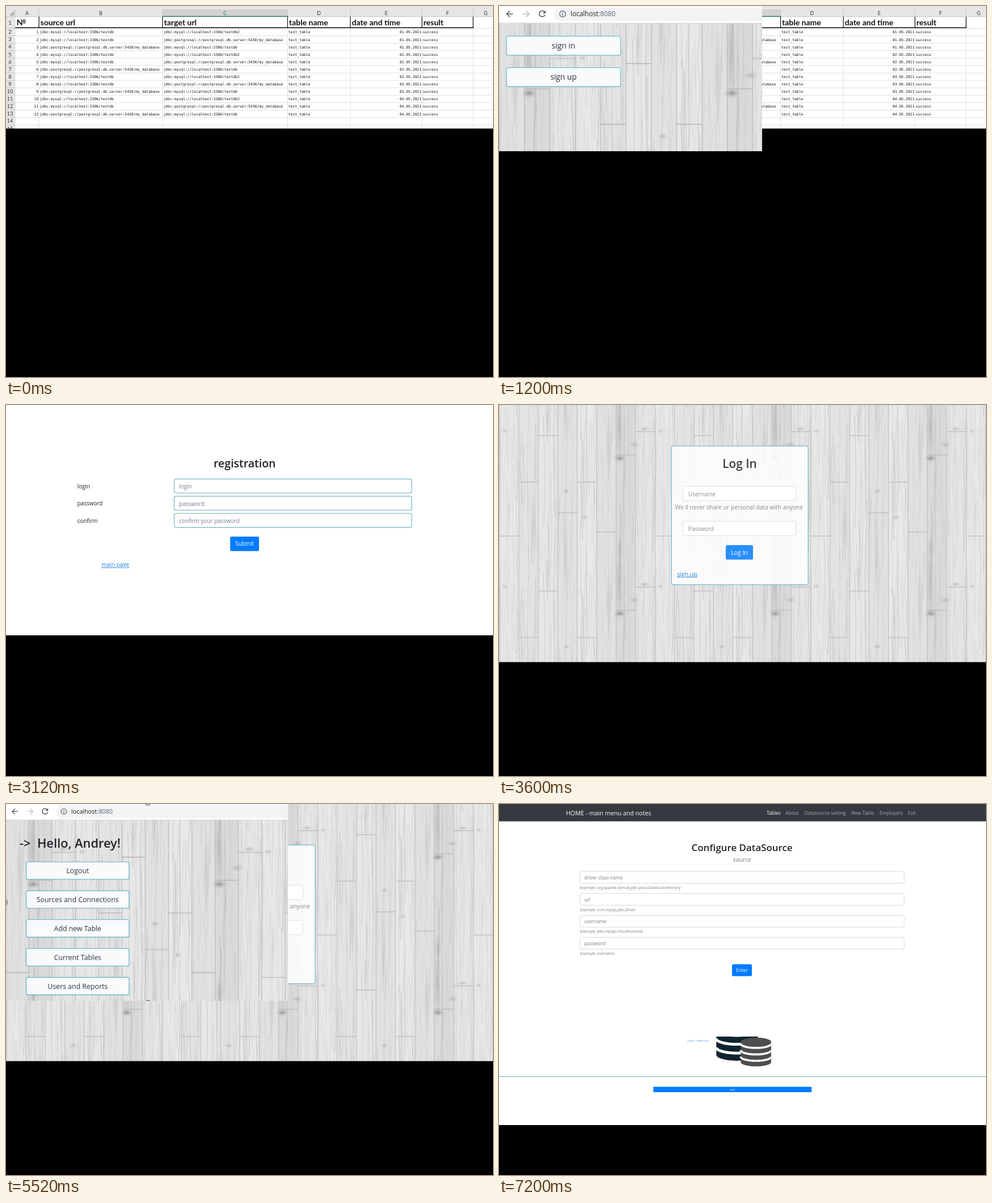
An HTML page for the animation above (8000 ms loop, 857 by 654 pixels).

```html
<!DOCTYPE html>
<html lang="en">
<head>
<meta charset="utf-8">
<style>
html, body { margin: 0; width: 100%; height: 100%; overflow: hidden; background: #000; }
#stage { display: block; width: 857px; height: 654px; font-family: "Open Sans", "Noto Sans", sans-serif; }
.mono { font-family: "DejaVu Sans Mono", monospace; }
.sheet { font-family: Lato, "Open Sans", sans-serif; }
text { white-space: pre; }
</style>
</head>
<body>
<svg id="stage" viewBox="0 0 857 654" xmlns="http://www.w3.org/2000/svg"></svg>
<script>
const LOOP = 8000, STEP = 1200;
const BLUE = '#007bff', TEAL = '#5ab1bf', DARK = '#212529', GREY = '#777c81';

const rect = (x, y, w, h, fill, more = '') =>
  `<rect x="${x}" y="${y}" width="${w}" height="${h}" fill="${fill}" ${more}/>`;
const box = (x, y, w, h, fill, stroke, sw = 1) =>
  rect(x, y, w, h, fill, `rx="3" stroke="${stroke}" stroke-width="${sw}"`);
const line = (x1, y1, x2, y2, stroke, sw = 1) =>
  `<path d="M${x1} ${y1}L${x2} ${y2}" stroke="${stroke}" stroke-width="${sw}"/>`;
const text = (x, y, size, s, fill = DARK, more = '') =>
  `<text x="${x}" y="${y}" font-size="${size}" fill="${fill}" ${more}>${s.replace(/>/g, '&gt;')}</text>`;
const MID = 'text-anchor="middle"', END = 'text-anchor="end"', SEMI = 'font-weight="600"';
const layer = (w, h, body) =>
  `<svg class="layer" width="${w}" height="${h}">${body}</svg>`;

function random(seed) {
  return () => (seed = (seed * 16807) % 2147483647) / 2147483647;
}

// Wooden wall: eight planks per square tile
function woodDefs() {
  const T = 273.8, P = T / 8, rnd = random(77);
  const joints = [231, 136, 54, 190, 136, 224, 88, 47];
  const tones = [0, .025, .005, .03, 0, .03, .06, .01];
  const knots = [[212, 94, 11, 6, .42], [211, 40, 6, 75, .2], [193, 70, 5, 60, .12], [10, 46, 6, 4, .2],
    [118, 152, 7, 4, .22], [151, 198, 6, 5, .22], [256, 42, 9, 4, .22], [238, 70, 10, 5, .2],
    [86, 25, 5, 40, .12], [60, 210, 5, 60, .1], [212, 255, 6, 30, .16], [17, 180, 5, 50, .08]];
  let s = rect(0, 0, T, T, '#e8e8e8');
  for (let p = 0; p < 8; p++) {
    s += rect(p * P, 0, P, T, '#000', `opacity="${tones[p]}"`);
    for (let k = 0; k < 17; k++) {
      const x = p * P + 2 + rnd() * (P - 4), amp = .4 + rnd() * 1.5, ph = rnd() * 6.28;
      const n = 1 + Math.floor(rnd() * 3), y0 = rnd() * T, len = 50 + rnd() * 190;
      let d = '';
      for (let y = y0; y <= y0 + len; y += 9) {
        const gx = x + amp * Math.sin(y / T * 6.283 * n + ph);
        d += (d ? 'L' : 'M') + gx.toFixed(1) + ' ' + y.toFixed(1);
      }
      const look = `fill="none" stroke="#666" stroke-width="${(.4 + rnd() * .8).toFixed(2)}" opacity="${(.06 + rnd() * .17).toFixed(2)}"`;
      s += `<path d="${d}" ${look}/><path d="${d}" ${look} transform="translate(0 ${-T})"/>`;
    }
  }
  for (const [x, y, rx, ry, o] of knots)
    s += `<ellipse cx="${x}" cy="${y}" rx="${rx}" ry="${ry}" fill="url(#knot)" opacity="${o * 1.4}"/>`;
  joints.forEach((y, p) => {
    s += line(p * P, y, (p + 1) * P, y, '#a9a9a9', .9) + line(p * P + .45, 0, p * P + .45, T, '#b2b2b2', .9);
  });
  const use = (id, x, y, k) =>
    `<pattern id="${id}" href="#wood" patternTransform="translate(${x} ${y}) scale(${k})"/>`;
  return `<defs><radialGradient id="knot"><stop offset="0" stop-color="#666"/><stop offset=".4" stop-color="#777" stop-opacity=".6"/><stop offset="1" stop-color="#888" stop-opacity="0"/></radialGradient>
    <pattern id="wood" width="${T}" height="${T}" patternUnits="userSpaceOnUse">${s}</pattern>` +
    use('woodHome', 133.6, 31.3, 1.303) + use('woodLogin', .3, 0, 1) + use('woodMenu', 121.5, 29, 1.198) + '</defs>';
}

function sheet() {
  const xs = [16, 58, 275.5, 495.5, 606, 732, 822, 866];
  const heads = ['№', 'source url', 'target url', 'table name', 'date and time', 'result'];
  const my = 'jdbc:mysql://localhost:3306/testdb';
  const pg = 'jdbc:postgresql://postgresql.db.server:5430/my_database';
  const from = [my, my, pg], to = [my + '2', pg, my];
  const rowY = r => 39.4 + 13.1 * (r - 2);
  let s = rect(0, 0, 857, 216, '#fff') + rect(0, 0, 857, 19, '#e6e6e6') + rect(0, 0, 16, 216, '#e6e6e6');
  s += rect(275.5, 6, 220, 12.5, '#d2d2d2') + '<path d="M14 8.5V17H5.5Z" fill="#b4b4b4"/>';
  xs.forEach((x, i) => {
    s += line(x, 19, x, 216, '#d9d9d9', .8) + line(x, 6, x, 19, '#bdbdbd', .8);
    if (i < 7) s += text(i < 6 ? (x + xs[i + 1]) / 2 : 844, 16, 9, 'ABCDEFG'[i], i == 2 ? '#217346' : '#333', MID);
  });
  for (let r = 2; r <= 15; r++) {
    const y = rowY(r);
    s += line(16, y, 857, y, '#d9d9d9', .8) + line(0, y, 16, y, '#bdbdbd', .8);
    s += text(7, y + 9.8, 9.3, '' + r, '#333', MID);
  }
  s += text(7, 33, 9.3, '1', '#333', MID) + line(0, 18.8, 857, 18.8, '#b0b0b0', .7);
  s += line(275, 18.4, 496, 18.4, '#217346', 1.3) + line(16, 38.3, 822.6, 38.3, '#111', 1.4);
  heads.forEach((h, i) => {
    s += text(xs[i] + 2.5, 34, 14, h, '#111', 'font-weight="700"') + line(xs[i + 1], 19, xs[i + 1], 39, '#111', 1.2);
  });
  let cells = '';
  for (let i = 0; i < 12; i++) {
    const y = rowY(i + 2) + 9, cell = (x, v, more) => text(x, y, 6.36, v, '#111', more);
    cells += cell(57, '' + (i + 1), END) + cell(59.5, from[i % 3]) + cell(277, to[i % 3]) + cell(497, 'test_table') +
      cell(731, `0${1 + Math.floor(i / 3)}.05.2021`, END) + cell(733.5, 'success');
  }
  return `<g class="sheet">${s}</g><g class="mono">${cells}</g>`;
}

function toolbar(w) {
  const arrow = (x, dir, c) =>
    `<path d="M${x - 5.5 * dir} 14H${x + 5.5 * dir}M${x} 8.6L${x + 5.5 * dir} 14L${x} 19.4" fill="none" stroke="${c}" stroke-width="1.5"/>`;
  return rect(-5, -5, w, 35, '#fff') + rect(97, 1.5, w, 25, '#f1f3f4', 'rx="12.5"') + line(-5, 30, w, 30, '#dcdcdc') +
    arrow(19, -1, '#54585c') + arrow(47.5, 1, '#bcbec1') +
    '<path d="M80.3 10.6A5.2 5.2 0 1 0 81 15.4" fill="none" stroke="#54585c" stroke-width="1.6"/><path d="M82 7.8V13H76.8Z" fill="#54585c"/>' +
    '<circle cx="112" cy="14" r="5.3" fill="none" stroke="#5f6368" stroke-width="1.3"/><path d="M112 13v4M112 10.6v1.5" stroke="#5f6368" stroke-width="1.4"/>' +
    text(126, 18.2, 11.7, 'localhost<tspan fill="#5f6368">:8080</tspan>'.replace(/>/g, '\u0001'), '#202124').replace(/\u0001/g, '>');
}

const button = (x, y, w, h, label, size) =>
  box(x, y, w, h, '#f8fafc', TEAL, 1.1) + text(x + w / 2, y + h / 2 + size * .37, size, label, '#30353a', MID);
const solid = (x, y, w, h, label, size, fill = BLUE) =>
  rect(x, y, w, h, fill, 'rx="2.5"') + text(x + w / 2, y + h / 2 + size * .38, size, label, '#fff', MID);
const link = (x, y, size, s) => text(x, y, size, s, '#2580dc', 'text-decoration="underline"');

const home = () => rect(0, 0, 463, 256, 'url(#woodHome)') + toolbar(480) +
  button(13, 53.3, 201, 33.4, 'sign in', 13.7) + button(13, 108.7, 201, 33.4, 'sign up', 13.7);

function signUp() {
  const fields = [['login', 'login'], ['password', 'password'], ['confirm', 'confirm your password']];
  return rect(0, 0, 857, 406, '#fff') + text(420, 110, 19.5, 'registration', DARK, MID + SEMI) +
    fields.map(([a, b], i) => {
      const y = 130.5 + i * 30.3;
      return text(125.5, y + 16.6, 9.9, a) + box(296, y, 418, 24.6, '#fff', '#86c1c5', 1.4) + text(304.5, y + 16.8, 9.9, b, GREY);
    }).join('') +
    solid(394.5, 232, 50.7, 25.4, 'Submit', 9.9) + link(168, 285.3, 10, 'main page');
}

function logIn() {
  const field = (y, s) => box(323.5, y, 199, 25.3, '#fff', '#d8dbde', .9) + text(333, y + 17.2, 9.95, s, '#868b90');
  return rect(0, 0, 857, 453.5, 'url(#woodLogin)') +
    rect(303.5, 72.3, 240.5, 244.5, '#fff', `rx="3" fill-opacity=".86" stroke="${TEAL}"`) +
    text(423.5, 111, 20.8, 'Log In', '#3c4044', MID + SEMI) + field(143.3, 'Username') +
    text(310, 184.3, 10.28, 'We ll never share ur personal data with anyone', '#84898d') + field(205, 'Password') +
    solid(399, 247, 48, 25.4, 'Log In', 10.5, '#2a8ffc') + link(313.5, 301.8, 10.5, 'sign up');
}

function menu() {
  const items = ['Logout', 'Sources and Connections', 'Add new Table', 'Current Tables', 'Users and Reports'];
  return rect(0, 0, 496, 347, 'url(#woodMenu)') +
    `<g transform="translate(-1.6 .2) scale(.924)">${toolbar(560)}</g>` +
    '<path d="M245.5 0Q249.5 4.5 253.5 0M0 169.5Q4 173.5 0 178M247 346.5h6" fill="none" stroke="#555" stroke-width="1.2"/>' +
    text(24, 77, 21.8, '->', DARK, SEMI) + text(55, 77, 21.8, 'Hello, Andrey!', DARK, SEMI) +
    items.map((s, i) => button(35.6, 102 + i * 50.9, 181, 30.8, s, 12.3)).join('');
}

// Database drum, 73.5 by 70 at k = 1
function drum(x, y, k, fill) {
  const arc = e => `<path d="M-.5 ${e}A37.2 10.5 0 0 0 74 ${e}" fill="none" stroke="#fff" stroke-width="5"/>`;
  return `<g transform="translate(${x} ${y}) scale(${k})"><path d="M0 10.5A36.75 10.5 0 0 1 73.5 10.5V59.5A36.75 10.5 0 0 1 0 59.5Z" fill="${fill}"/>` +
    [14.5, 30.3, 46].map(arc).join('') + '</g>';
}

const navItems = ['Tables', 'About', 'Datasource setting', 'New Table', 'Employers', 'Exit'];
const nav = (xs, y, size) => navItems.map((s, i) =>
  text(xs[i], y, size, s, i ? '#a6a9ac' : '#fff', i ? '' : 'font-weight="500"')).join('');

function dataSource() {
  const rule = y => line(0, y, 857, y, '#6cafb4', 1.2);
  const label = (y, s, c, more = '') => text(350.2, y, 3.72, s, c, MID + more);
  let s = rect(0, 0, 857, 566, '#fff') + rect(0, .8, 857, 13.4, '#343a40');
  s += text(275.5, 9.7, 4.66, 'HOME - main menu and notes', '#fff') + nav([429.7, 444.5, 459, 495, 516, 538], 9.2, 3.65);
  s += text(411, 66.8, 7.5, 'Configure DataSource', DARK, MID + ' font-weight="500"');
  s += rect(0, 80, 857, 125.5, BLUE) + [217.4, 343.3, 355.3, 480.5].map(rule).join('');
  s += label(144, 'ENTER DATASOURCE', '#fff', SEMI) + label(281.4, 'CHECK ALL DATASOURCE', '#4a92ea') + label(418.8, 'CREATE CONNECTION', '#4a92ea');
  s += drum(391.8, 108, 1, '#1f2a35');
  for (const y of [260, 280.3, 300.5])
    s += `<circle cx="401.5" cy="${y}" r="7.7" fill="none" stroke="#000" stroke-width="2.8"/>` + rect(419, y - 5, 52, 10, '#000', 'rx="5"');
  const tick = (c, w) => `<path d="M393.5 254.5L401.5 260.8L414.5 245.5" fill="none" stroke="${c}" stroke-width="${w}" stroke-linecap="round"/>`;
  s += tick('#fff', 7) + tick('#000', 5);
  s += drum(382.4, 383, .995, '#10232f') + drum(425.5, 411.7, .727, '#4e4e4e');
  return s + rect(271.5, 498.5, 278.5, 9.6, BLUE, 'rx=".8"') + text(410.7, 504.7, 3.7, 'back', '#fff', MID + SEMI);
}

function form() {
  const fields = [['driver class name', 'org.apache.tomcat.jdbc.pool.DataSourceFactory'], ['url', 'com.mysql.jdbc.Driver'],
    ['username', 'jdbc:mysql://localhost/test'], ['password', 'username']];
  return rect(0, 0, 857, 410, '#fff') + rect(0, 0, 857, 30.6, '#343a40') +
    text(118, 20, 10.67, 'HOME - main menu and notes', '#fff') + nav([471, 504, 537.5, 620, 669.7, 719.5], 18.8, 8.35) +
    text(427.7, 83, 16.9, 'Configure DataSource', DARK, MID + SEMI) + text(427.7, 101.8, 10.2, 'source', '#6c757d', MID) +
    fields.map(([a, b], i) => {
      const y = 119 + i * 38.7;
      return box(142.5, y, 570.5, 20.8, '#fff', '#d0d5da', .9) + text(150, y + 14, 8.3, a, GREY) +
        text(142.5, y + 31, 6.6, 'Example: ' + b, GREY);
    }).join('') + solid(410, 282.5, 35, 21, 'Enter', 8.25);
}

const stage = document.getElementById('stage');
stage.innerHTML = woodDefs() + layer(857, 216, sheet()) + layer(463, 256, home()) + layer(857, 406, signUp()) +
  layer(857, 453.5, logIn()) + layer(496, 347, menu()) + layer(857, 566, dataSource()) + layer(857, 410, form());
const layers = [...stage.querySelectorAll('.layer')];

// Each screen is laid over the ones before it
function draw(t) {
  layers.forEach((el, i) => { el.style.display = t >= i * STEP ? '' : 'none'; });
}
const start = performance.now();
function tick() {
  draw((performance.now() - start) % LOOP);
  requestAnimationFrame(tick);
}
tick();
</script>
</body>
</html>
```
